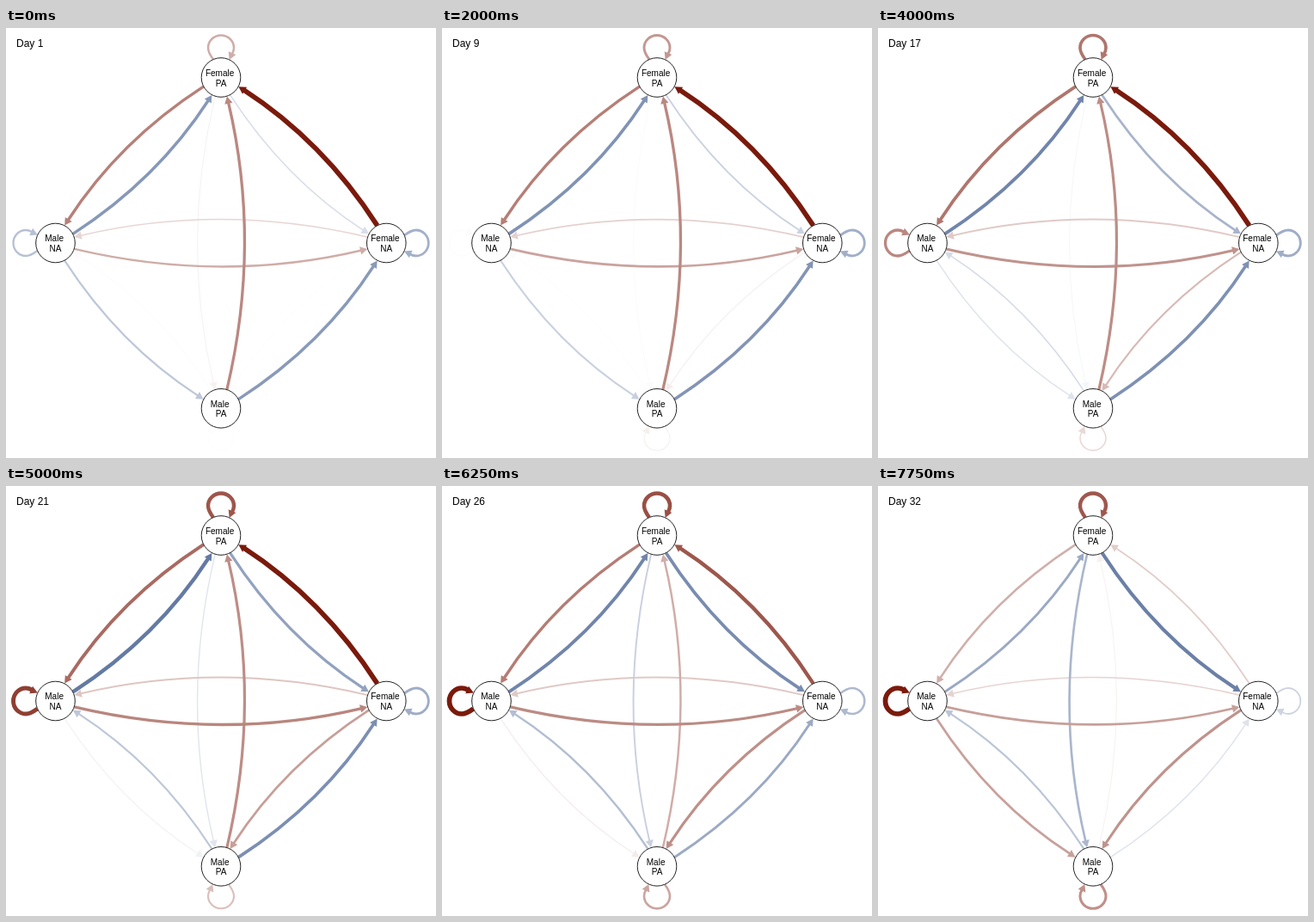
Write an HTML page that moves like this. It is 500 by 500 pixels and loops after 8 s.

```html
<!DOCTYPE html>
<html lang="en">
<head>
<meta charset="utf-8">
<title>Daily network</title>
<style>
  html, body { margin: 0; width: 100%; height: 100%; overflow: hidden; background: #fff; }
  svg { display: block; width: 100vw; height: 100vh; }
  text { font-family: "Liberation Sans", Arial, sans-serif; font-size: 10px; text-anchor: middle; }
  #day { font-size: 12px; text-anchor: start; }
  circle { fill: #fff; stroke: #222; }
</style>
</head>
<body>
<svg viewBox="0 0 500 500">
  <g id="edges"></g>
  <g id="nodes"></g>
  <text id="day" x="12" y="22"></text>
</svg>
<script>
const DAYS = 32, STEP = 250, R = 23;
const RED = [122, 26, 12], BLUE = [37, 68, 126];
const keyDays = [1, 9, 17, 21, 24, 28, 32];

// x, y, label, loop rotation
const nodes = {
  F: [250, 57.5, 'Female', 'PA', 0],
  f: [442.3, 250, 'Female', 'NA', 90],
  M: [250, 442.3, 'Male', 'PA', 180],
  m: [57.5, 250, 'Male', 'NA', -90]
};

// Signed weights in percent at the key days: positive is blue, negative red
const weights = {
  FF: [-36, -45, -60, -74, -78, -75, -73],
  mm: [33, -2, -52, -84, -100, -100, -100],
  ff: [42, 43, 44, 44, 41, 33, 23],
  MM: [-1, -7, -17, -28, -36, -42, -48],
  Fm: [-55, -56, -60, -65, -62, -50, -35],
  mF: [55, 58, 65, 71, 71, 58, 46],
  Ff: [18, 24, 40, 50, 60, 62, 68],
  fF: [-100, -100, -100, -100, -88, -57, -22],
  FM: [-6, -2, 5, 14, 21, 29, 39],
  MF: [-52, -52, -50, -50, -44, -26, -6],
  fm: [-18, -20, -23, -25, -25, -22, -19],
  mf: [-36, -40, -47, -53, -53, -48, -42],
  mM: [30, 25, 15, 7, 2, -20, -41],
  Mm: [-2, 2, 19, 30, 36, 33, 31],
  fM: [-1, -8, -30, -42, -49, -48, -47],
  Mf: [54, 57, 59, 60, 55, 35, 15]
};

function add(parent, tag, attrs, text) {
  const el = document.createElementNS('http://www.w3.org/2000/svg', tag);
  for (const k in attrs) el.setAttribute(k, attrs[k]);
  if (text) el.textContent = text;
  return parent.appendChild(el);
}

function arrowHead(x, y, dx, dy) {
  const len = 8.5, half = 4.7, bx = x - len * dx, by = y - len * dy;
  return `M${x},${y}L${bx - half * dy},${by + half * dx}L${bx + half * dy},${by - half * dx}Z`;
}

function loopShape() {
  return {
    line: 'M-9,-21C-12,-25 -15,-29 -15,-34.5A15,14.5 0 0 1 15,-34.5Q15,-31 13,-27.5',
    head: arrowHead(9.6, -20.6, -.4, .917)
  };
}

function curveShape([ax, ay], [bx, by]) {
  const len = Math.hypot(bx - ax, by - ay);
  const dx = (bx - ax) / len, dy = (by - ay) / len;
  const at = (along, off) => [ax + along * dx - off * dy, ay + along * dy + off * dx];
  const inset = R * .954, off = R * .3, bend = 2 * .0703 * len - off;
  const start = at(inset, off), ctrl = at(len / 2, bend), tip = at(len - inset, off);
  const tl = Math.hypot(tip[0] - ctrl[0], tip[1] - ctrl[1]);
  const tx = (tip[0] - ctrl[0]) / tl, ty = (tip[1] - ctrl[1]) / tl;
  const end = [tip[0] - 7 * tx, tip[1] - 7 * ty];
  return { line: `M${start}Q${ctrl} ${end}`, head: arrowHead(tip[0], tip[1], tx, ty) };
}

// Hermite curve through the key days
function weightAt(v, day) {
  let i = 0;
  while (i < keyDays.length - 2 && day > keyDays[i + 1]) i++;
  const slope = j => {
    const a = Math.max(j - 1, 0), b = Math.min(j + 1, v.length - 1);
    if ((v[j] - v[a]) * (v[b] - v[j]) < 0) return 0;
    return (v[b] - v[a]) / (keyDays[b] - keyDays[a]);
  };
  const h = keyDays[i + 1] - keyDays[i], u = (day - keyDays[i]) / h;
  const s = u * u * (3 - 2 * u);
  const w = v[i] * (1 - s) + v[i + 1] * s
    + h * u * (1 - u) * ((1 - u) * slope(i) - u * slope(i + 1));
  return Math.max(-1, Math.min(1, w / 100));
}

const layer = document.getElementById('edges');
const label = document.getElementById('day');

const edges = Object.entries(weights).map(([key, values]) => {
  const from = nodes[key[0]], to = nodes[key[1]];
  const isLoop = from === to;
  const shape = isLoop ? loopShape() : curveShape(from, to);
  const g = add(layer, 'g', isLoop
    ? { transform: `translate(${from[0]} ${from[1]}) rotate(${from[4]})` } : {});
  add(g, 'path', { d: shape.line, fill: 'none' });
  add(g, 'path', { d: shape.head, stroke: 'none' });
  return { g, values };
});

for (const [x, y, top, bottom] of Object.values(nodes)) {
  const g = add(document.getElementById('nodes'), 'g', { transform: `translate(${x} ${y})` });
  add(g, 'circle', { r: R - .2 });
  add(g, 'text', { x: -1.4, y: -1.6 }, top);
  add(g, 'text', { y: 10 }, bottom);
}

function draw(day) {
  label.textContent = 'Day ' + day;
  for (const e of edges) {
    const w = weightAt(e.values, day);
    e.size = Math.abs(w);
    const ink = (w < 0 ? RED : BLUE).map(c => Math.round(255 + (c - 255) * e.size));
    const color = `rgb(${ink})`;
    e.g.setAttribute('stroke', color);
    e.g.setAttribute('fill', color);
    e.g.setAttribute('stroke-width', .7 + 5 * e.size);
  }
  // Strongest edges on top
  [...edges].sort((a, b) => a.size - b.size).forEach(e => layer.appendChild(e.g));
}

let shown = 0;
function tick() {
  const day = Math.floor(performance.now() / STEP) % DAYS + 1;
  if (day !== shown) draw(shown = day);
  requestAnimationFrame(tick);
}
tick();
</script>
</body>
</html>
```
